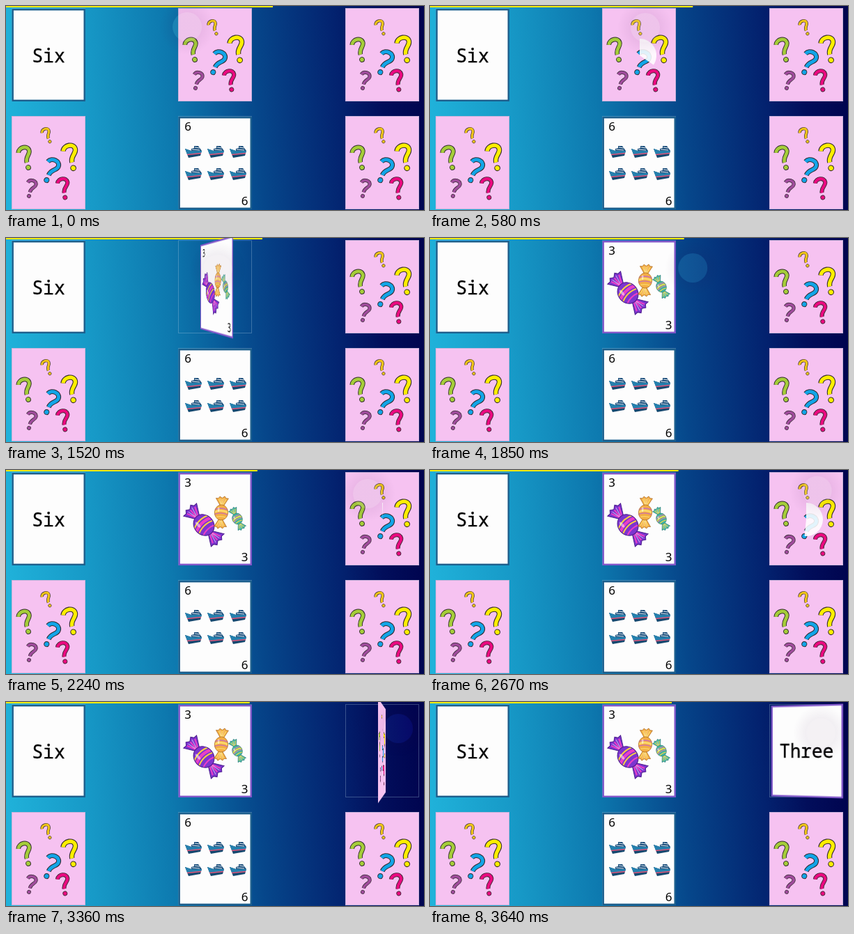
An HTML page that plays this animation: 600 px wide and 293 px high, repeating every 3.67 s.

```html
<!DOCTYPE html>
<html lang="en">
<head>
<meta charset="utf-8">
<title>Number match</title>
<style>
  html, body { margin: 0; width: 100%; height: 100%; overflow: hidden; background: #00044f; }
  #stage { position: relative; width: 600px; height: 293px; overflow: hidden; }
  #stage > svg { position: absolute; left: 0; top: 0; }
  .card { position: absolute; width: 106px; height: 134px; }
  .card svg { position: absolute; left: 0; top: 0; overflow: visible; }
  .word { font: 26.5px "Noto Sans Mono", monospace; text-anchor: middle; stroke: #000; stroke-width: .3px; }
  .num { font: 17px "Noto Sans", sans-serif; text-anchor: middle; }
  #cursor {
    position: absolute; left: -21px; top: -21px; width: 42px; height: 42px;
    border-radius: 50%; background: #fff; opacity: .38; mix-blend-mode: soft-light;
  }
</style>
</head>
<body>
<div id="stage">
  <svg width="600" height="293">
    <defs>
      <linearGradient id="sky" gradientUnits="userSpaceOnUse" x1="0" y1="170" x2="600" y2="125">
        <stop offset="0" stop-color="#20b2da"/>
        <stop offset=".2" stop-color="#1799c7"/>
        <stop offset=".4" stop-color="#0d78ae"/>
        <stop offset=".6" stop-color="#06478b"/>
        <stop offset=".8" stop-color="#03226f"/>
        <stop offset=".9" stop-color="#020e5b"/>
        <stop offset="1" stop-color="#00044f"/>
      </linearGradient>
      <radialGradient id="shade">
        <stop offset=".5" stop-color="#304" stop-opacity=".06"/>
        <stop offset="1" stop-color="#304" stop-opacity="0"/>
      </radialGradient>
      <clipPath id="ball"><ellipse rx="14" ry="16"/></clipPath>
      <g id="ship">
        <path d="M-3-2V-5L1-6V-9L7-9 12-2Z" fill="#1d4f7c"/>
        <path d="M-2-4L9-3M2-7L9-6" stroke="#dfeaf2" stroke-width="1.2"/>
        <path d="M-12-5L-3-2 12-2 10 5-7 8Z" fill="#15486f"/>
        <path d="M-12-5L-3-2 12-2 11 1-9 3Z" fill="#2580ae"/>
        <path d="M-9 3.5L11 1.5" stroke="#e2577c" stroke-width="1.6"/>
      </g>
    </defs>
    <rect width="600" height="293" fill="url(#sky)"/>
    <rect id="bar" height="2" fill="#ffe80c"/>
    <g id="slots" fill="none" stroke="#b9d3e6" stroke-opacity=".6" stroke-dasharray="1 1"></g>
  </svg>
  <div id="cards"></div>
  <svg width="600" height="293">
    <path id="pie" fill="#fff" fill-opacity=".88"/>
    <circle id="shadow" r="40" fill="url(#shade)"/>
  </svg>
  <div id="cursor"></div>
</div>
<script>
const LOOP = 3670, DWELL = 845, FLIP = 600;
const COLS = [8, 247, 487], ROWS = [3, 158];
const BLUE = '#1b5e8c', PURPLE = '#8056c9';
const $ = id => document.getElementById(id);

// x, y, scale, turn, colour
const marks = [
  [51, 28, .58, -24, '#f0c419'],
  [20, 60, .88, -16, '#a5cd39'],
  [85, 59, .98, -13, '#ffee00'],
  [56, 78, .92, 22, '#12a5e8'],
  [27.5, 104, .68, 13, '#a04c9c'],
  [74.5, 104, .8, -10, '#ea0a80']
];

function mark([x, y, s, turn, color]) {
  const hook = 'M-9-11C-6-20 9-19 9-10C9-3 0-2 0 8';
  return `<g transform="translate(${x} ${y}) rotate(${turn}) scale(${s})" fill="none">
    <path d="${hook}" stroke="#332b30" stroke-width="7.6"/>
    <path d="${hook}" stroke="${color}" stroke-width="5.4"/>
    <circle cy="16.5" r="3.9" fill="${color}" stroke="#332b30" stroke-width="1.1"/></g>`;
}

function candy(x, y, s, turn, [main, band, light, dark]) {
  const fan = `<path d="M-3-14L-13-29-8-29-5-33 0-30 5-34 8-30 13-30 4-14Z" fill="${main}" stroke="${dark}"/>
    <path d="M-1-15L-7-28M0-15L0-29M2-15L8-28" stroke="${band}" stroke-width="2"/>
    <path d="M-1-17L-4-29M1-17L4-30" stroke="#fff" stroke-opacity=".6"/>`;
  const stripe = (cy, color, w) =>
    `<path d="M-16 ${cy + 3}Q0 ${cy - 6} 16 ${cy + 2}" fill="none" stroke="${color}" stroke-width="${w}"/>`;
  return `<g transform="translate(${x} ${y}) rotate(${turn}) scale(${s})">
    ${fan}<g transform="rotate(180)">${fan}</g>
    <ellipse rx="14" ry="16" fill="${main}"/>
    <g clip-path="url(#ball)">${stripe(-7, light, 2)}${stripe(-2, band, 4)}${stripe(3, light, 2)}${stripe(10, band, 2)}</g>
    <ellipse rx="14" ry="16" fill="none" stroke="${dark}"/>
    <ellipse cx="-6" cy="-6" rx="2" ry="5" fill="#fff" opacity=".5"/></g>`;
}

const svg = body => `<svg width="106" height="134">${body}</svg>`;
const face = (color, body) => svg(
  `<rect x="1.7" y="2.2" width="103" height="130.6" fill="#fdfdfd" stroke="${color}" stroke-width="2.4"/>${body}`);
const word = text => `<text class="word" x="53" y="77.5">${text}</text>`;
const corners = n => `<text class="num" x="14" y="21">${n}</text>
  <text class="num" x="95.5" y="127.5">${n}</text>`;

const back = svg(`<rect x=".5" y=".5" width="105" height="133" fill="#f6c2f1" stroke="#c9b3da"/>`
  + marks.map(mark).join(''));

const ships = [52, 84].map(y => [22, 54, 86].map(x =>
  `<use href="#ship" x="${x}" y="${y}"/>`).join('')).join('');

const sweets = candy(37, 76, 1, -42, ['#7c35cf', '#ec3fc6', '#ffd23c', '#4b1c8c'])
  + candy(62, 58, .69, 4, ['#f3ad45', '#fbd96a', '#c86fb0', '#a8651c'])
  + candy(85, 67, .51, -27, ['#3fb3a0', '#f2d64b', '#ef7aa5', '#236f70']);

// column, row, front, time of the turn
const cards = [
  [0, 0, face(BLUE, word('Six')), -LOOP],
  [1, 0, face(PURPLE, sweets + corners(3)), 1134],
  [2, 0, face(PURPLE, word('Three')), 3080],
  [0, 1, '', Infinity],
  [1, 1, face(BLUE, ships + corners(6)), -LOOP],
  [2, 1, '', Infinity]
].map(([col, row, front, start]) => {
  const el = document.createElement('div');
  const x = COLS[col], y = ROWS[row];
  el.className = 'card';
  el.style.left = x + 'px';
  el.style.top = y + 'px';
  $('cards').append(el);
  $('slots').innerHTML += `<rect x="${x + .5}" y="${y + .5}" width="105" height="133"/>`;
  return { el, front, start, shown: null };
});

const clamp = v => Math.max(0, Math.min(1, v));

function turnCard(card, t) {
  const p = clamp((t - card.start) / FLIP);
  const open = p >= .5;
  const angle = 180 * p - (open ? 180 : 0);
  if (card.shown !== open) {
    card.el.innerHTML = open ? card.front : back;
    card.shown = open;
  }
  card.el.style.transform = angle ? `perspective(470px) rotateY(${angle}deg)` : 'none';
}

// time, x, y
const path = [
  [0, 260, 30], [290, 290, 29], [580, 309, 31], [1030, 306, 40], [1520, 304, 45], [1700, 310, 46],
  [2100, 488, 38], [2240, 519, 34], [2550, 553, 29], [3090, 565, 32], [LOOP, 561, 45]
];

function cursorAt(t) {
  const i = path.findIndex(k => k[0] > t);
  const a = path[i - 1], b = path[i];
  const p = (t - a[0]) / (b[0] - a[0]);
  return [a[1] + (b[1] - a[1]) * p, a[2] + (b[2] - a[2]) * p];
}

function pieAt(t) {
  for (const [start, x] of [[289, 301], [2235, 540]]) {
    const p = (t - start) / DWELL;
    if (p <= 0 || p >= 1) continue;
    const a = p * 2 * Math.PI, r = 24, y = 71;
    return `M${x} ${y}V${y - r}A${r} ${r} 0 ${p > .5 ? 1 : 0} 1 ${x + r * Math.sin(a)} ${y - r * Math.cos(a)}Z`;
  }
  return '';
}

function draw(t) {
  const [x, y] = cursorAt(t);
  $('bar').setAttribute('width', 383 - t * 36 / 3640);
  cards.forEach(card => turnCard(card, t));
  $('pie').setAttribute('d', pieAt(t));
  $('shadow').setAttribute('transform', `translate(${x} ${y})`);
  $('cursor').style.transform = `translate(${x}px, ${y}px)`;
}

const begin = performance.now();
function tick() {
  draw((performance.now() - begin) % LOOP);
  requestAnimationFrame(tick);
}
tick();
</script>
</body>
</html>
```
